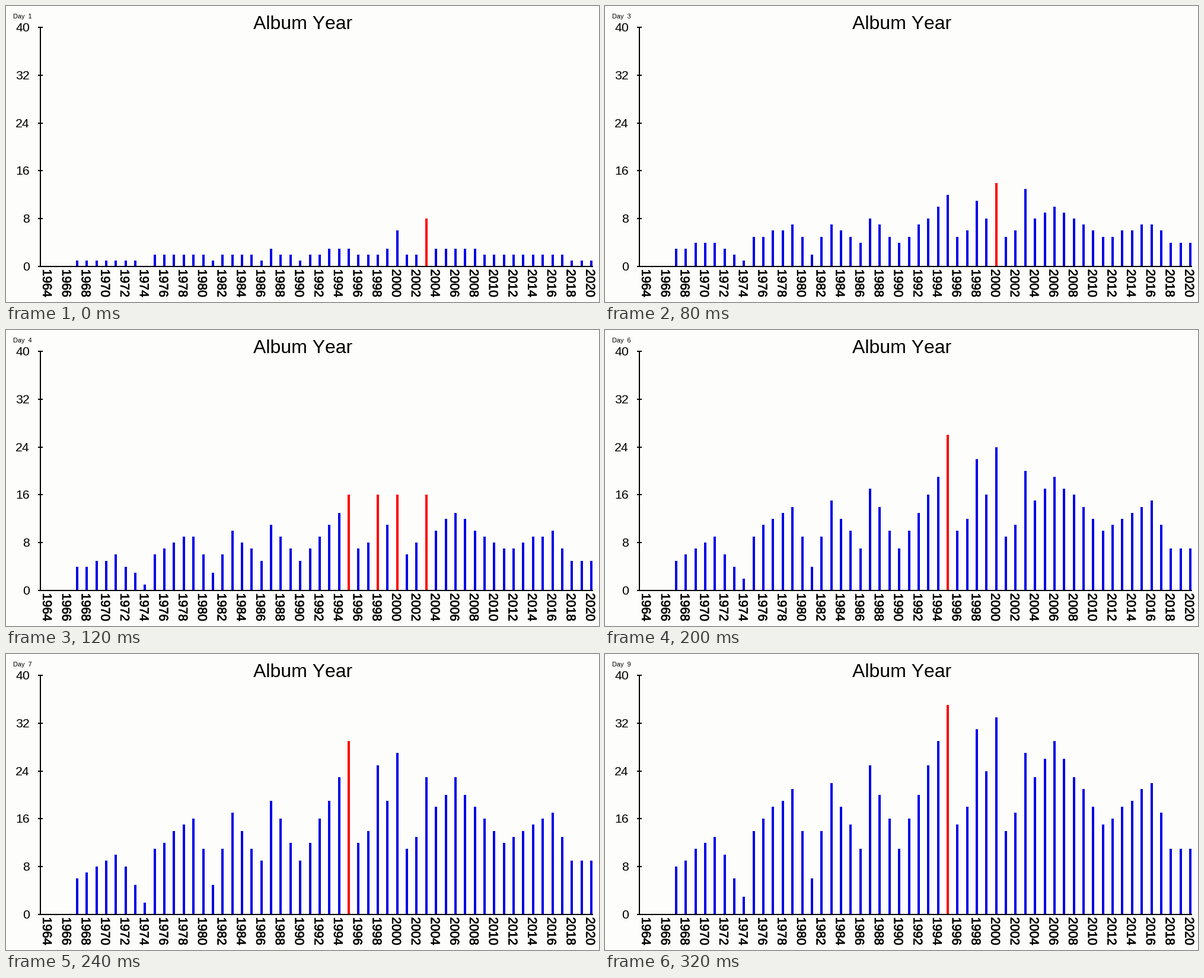
These frames come from a looping animation (1000x500 px, 0.36 s). A matplotlib script:

```python
import numpy as np
import matplotlib.pyplot as plt
from matplotlib.animation import FuncAnimation
from matplotlib.patches import Rectangle
from matplotlib.patheffects import withStroke

WIDTH, HEIGHT, DPI = 1000, 500, 100
DAYS, INTERVAL = 9, 40
BASE_Y, UNIT = 440, 10.1
BLUE, RED, PAPER = "#0000e8", "#ff0000", "#fdfdfb"
YEARS = np.arange(1964, 2021)

# Turning points of the final profile: year -> total
PROFILE = {1966: 0, 1967: 8, 1971: 13, 1974: 3, 1975: 14, 1979: 21,
           1981: 6, 1983: 22, 1986: 11, 1987: 25, 1990: 11, 1994: 29,
           1996: 15, 1999: 24, 2001: 14, 2006: 29, 2011: 15, 2016: 22,
           2018: 11}

# Years that take turns in the lead: day -> total
LEADERS = {
    1995: {1: 3, 4: 16, 6: 26, 8: 31, 9: 35},
    1998: {1: 2, 4: 16, 9: 31},
    2000: {1: 6, 2: 12, 4: 16, 8: 31, 9: 33},
    2003: {1: 8, 4: 16, 9: 27},
}


def along(points, x):
    return np.interp(x, list(points), list(points.values()))


def totals_on(day):
    """Totals grow steadily; only the leaders follow their own pace."""
    totals = along(PROFILE, YEARS) * day / DAYS
    for year, pace in LEADERS.items():
        totals[year - YEARS[0]] = along(pace, day)
    return np.floor(totals + 0.5)


def px(size):
    return size * 72 / DPI


def block(x, y, w, h):
    ax.add_patch(Rectangle((x, y), w, h, color="black", lw=0,
                           antialiased=False, zorder=3))


def label(x, y, text, size, **style):
    return ax.text(x, y, text, fontsize=px(size), va="baseline", **style)


plt.rcParams["font.family"] = "Liberation Sans"
plt.rcParams["text.kerning_factor"] = 6  # plain advances, no pair kerning
fig = plt.figure(figsize=(WIDTH / DPI, HEIGHT / DPI), dpi=DPI, facecolor=PAPER)
ax = fig.add_axes([0, 0, 1, 1])
ax.axis("off")

centers = 70.8 + 16.36 * np.arange(len(YEARS))
bars = ax.bar(np.round(centers), 0, width=4, bottom=BASE_Y, lw=0,
              antialiased=False, zorder=2)
ax.set(xlim=(0, WIDTH), ylim=(HEIGHT, 0))

block(57, 35, 2, 406)
block(57, 439, 933, 2)
for value in range(0, 41, 8):
    y = round(BASE_Y - value * UNIT)
    block(54, y - 1, 8, 2)
    label(40, y + 7, str(value), 21.3, ha="right")

heavier = [withStroke(linewidth=px(0.7), foreground="black")]
for x, year in zip(centers[::2], YEARS[::2]):
    label(x - 8.5, 444.5, str(year), 21.3, ha="left", rotation=-90,
          rotation_mode="anchor", path_effects=heavier)

label(500.5, 39, "Album Year", 32, ha="center")
day_label = label(11.5, 21, "", 11, ha="left")


def draw(frame):
    totals = totals_on(frame + 1)
    for bar, total in zip(bars, totals):
        bar.set_height(-round(total * UNIT))
        bar.set_facecolor(RED if total == totals.max() else BLUE)
    day_label.set_text(f"Day  {frame + 1}")
    return [*bars, day_label]


anim = FuncAnimation(fig, draw, frames=DAYS, interval=INTERVAL,
                     repeat=True, repeat_delay=0)
plt.show()
```
